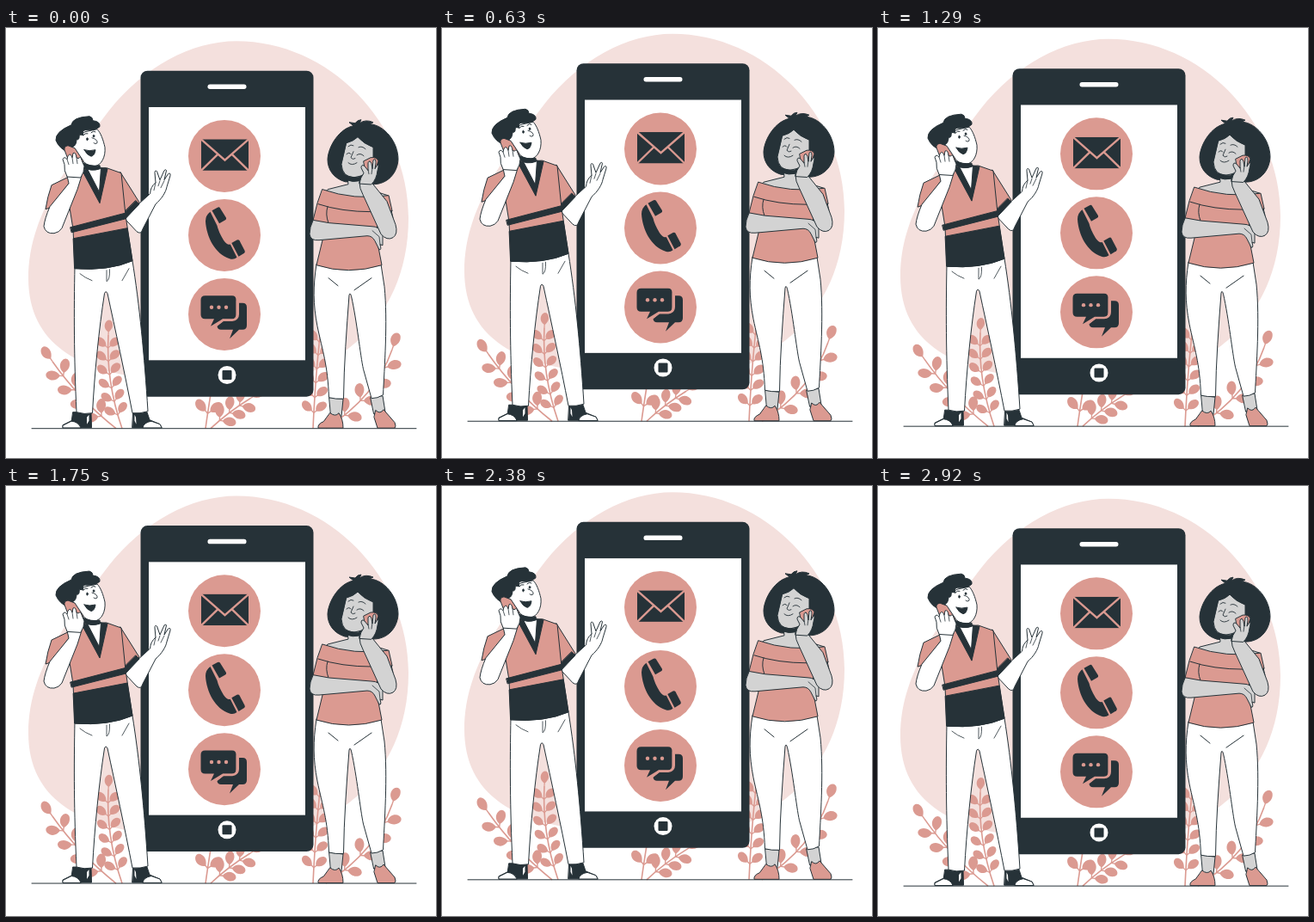
These frames come from a looping animation (500 px wide and 500 px high, 2.96 s). An HTML page:

```html
<!DOCTYPE html>
<html lang="en">
<head>
<meta charset="utf-8">
<title>Phone contact</title>
<style>
html, body { margin: 0; height: 100%; overflow: hidden; background: #fff; }
svg { display: block; width: 100vw; height: 100vh; }
.d { fill: #263238; }
.p { fill: #db9a91; }
.w { fill: #fff; }
.g { fill: #d3d3d3; }
.n { fill: none; }
.o { stroke: #263238; stroke-width: 1; stroke-linejoin: round; stroke-linecap: round; }
.cut { fill: none; stroke: #db9a91; stroke-width: 2.4; }
</style>
</head>
<body>
<svg viewBox="0 0 500 500">
<g id="scene">
  <path fill="#f4e0dd" d="M268 14.500C375 14.500 468 108 468 220C468 285 443 330 410 362C375 392 330 425 230 420C200 420 175 412 150 405C90 395 26 370 26 290C26 250 40 215 60 180C75 155 95 128 120 95C160 45 215 14.500 268 14.500Z"/>
  <g id="plants"></g>

  <g id="device">
    <rect class="d" x="156.500" y="49" width="201" height="379" rx="8"/>
    <rect class="w" x="166" y="91.300" width="182" height="294.300"/>
    <rect class="w" x="234.500" y="64.800" width="45" height="5.500" rx="2.700"/>
    <circle class="w" cx="257" cy="402.800" r="10.500"/>
    <rect class="d" x="251.500" y="397.300" width="11" height="11" rx="1"/>
    <g class="p">
      <circle cx="254" cy="148.200" r="42"/>
      <circle cx="254" cy="240.200" r="42"/>
      <circle cx="254" cy="332.200" r="42"/>
    </g>
    <rect class="d" x="227" y="128.800" width="55" height="36.200"/>
    <path class="cut" d="M226 128L254.500 153L283 128M226 166L246.500 146M283 166L262.500 146"/>
    <g class="d">
      <path d="M237.500 213Q232 217 232 224C233 242 243 262 260 267.500Q265 269 268.500 266L260.800 250.800Q257 252 253 246Q247 236 245.500 229Z"/>
      <path d="M239.500 211.500L246 208Q248 207 249 208.800L256 220Q256.500 221.500 255 222.500L248 226.500Z"/>
      <path d="M262.300 249.300L268.500 245.800Q270.500 244.800 271.500 246.500L277.500 258Q278.500 260 277 261L270.500 265Z"/>
      <path d="M271 319H275Q280 319 280 324V345Q280 350 275 350H271L260 360.500L264 350H250Q246 350 245.500 346L254 339H264Q271 339 271 332Z"/>
      <path d="M231.500 310.500H263Q267.500 310.500 267.500 315.500V332.500Q267.500 337.500 263 337.500H252L238 346L242 337.500H231.500Q226.500 337.500 226.500 332.500V315.500Q226.500 310.500 231.500 310.500Z"/>
    </g>
    <path class="cut" d="M239 349L252.500 339H263Q269 338.500 269 332.500V316"/>
    <g class="p">
      <circle cx="239" cy="324" r="2.200"/><circle cx="247.500" cy="324" r="2.200"/><circle cx="256" cy="324" r="2.200"/>
    </g>
  </g>

  <path class="o n" d="M30 465H477"/>

  <g id="man" class="o">
    <path class="d" d="M78 446H99L99.500 464H66V461L76 456Z"/>
    <path class="d" d="M148 446H164L167 455L179 460L181 464H147Z"/>
    <path class="w" d="M66 464V461.500L76 456.500Q84 457 87 464ZM181 464L179 460L169 456.500Q160 458 159 464Z"/>
    <path class="w" stroke="none" d="M94 452l2.500-3v7l-2.500 4ZM151 452l-1.500-3v7l2 4Z"/>
    <path class="w" d="M80 276C79 330 79 380 82 446Q91 449 100.500 447C103 400 108 350 114.500 308Q116 304 118 308C127 350 138 400 147 447Q156 448 165 445C161 380 155 320 147 270Z"/>
    <path class="n" stroke-width=".8" d="M86 285Q92 290 100 293M143 279L135 293M117 281V294Q121 292 120.500 280"/>
    <path class="w" d="M138 221L152 236Q157 240 159 233L174 204C181 198 186 190 187 184L191 171Q191.500 167 188.500 169L184 176L186.500 165Q186 163 184 165L179 176L175.500 166Q173 164 173 168L174 179Q168 184 167.500 192L151 207Z"/>
    <path class="n" stroke-width=".8" d="M174 179L172 188M179 177L177 183M184 177L180 185"/>
    <path class="p" d="M133 167L155 202L138 221Z"/>
    <path class="d" d="M151 200L155 204L139 221L137 214Z"/>
    <path class="p" d="M90 163L80 169L72 196L78 233L80 279Q119 282 147 270L139 217L134 168L117 162Z"/>
    <path class="d" d="M75 231L138.500 214.500L139.500 221L76.500 237ZM78.500 244L141 232L147 270Q119 282 80 279Z"/>
    <path class="d" d="M88 164L109 203L118 163L110.500 162L108.500 190L95 163Z"/>
    <path class="w" d="M94 162L108.500 190L110.500 162Z"/>
    <path class="w" d="M84 125L92 120L106 117C110 121 113 129 115 138C116 149 111 159 103 160Q93 160 87 151L77 139Z"/>
    <path class="d" d="M89 156Q99 161 109 159L109.500 163Q98 167 90 161Z"/>
    <path class="d" d="M73 144Q62 140 58 130Q57 120 76 112Q77 103 97 102Q101 103 101 107Q110 108 109 114Q104 119 92 118Q88 119 90 124L85 123Q86 130 82 129Q82 136 77 138Z"/>
    <path class="d" d="M91 141Q97 143 104 141Q103 148 99 148.500Q94 147 91 141Z"/>
    <path class="n" d="M100 127Q107 129 106 133Q104 135 102 133" stroke-width=".9"/>
    <ellipse class="d" cx="94.500" cy="128.500" rx=".8" ry="1.500"/><ellipse class="d" cx="102" cy="125" rx=".8" ry="1.400"/>
    <path class="n" d="M90 124Q92 121 95 122M99 121Q102 118 104 120"/>
    <path class="p" d="M80 169L53 182Q48 196 46 210L52 208L73 180Z"/>
    <path class="w" d="M71 171L73 180L51 207Q45 221 44 230Q46 239 56 238Q62 237 65 232L83 187L88 171Z"/>
    <path class="p" d="M68 141Q67 137 72 136L80 139L90 154L86 162L72 151Z"/>
    <path class="w" d="M71 172Q67 165 68 158L66 152Q68 148 71 152L72 148Q75 144 77 150L78 145Q81 143 82 150L84 151Q87 148 88 153L91 160Q91 167 87 173Z"/>
    <path class="n" stroke-width=".8" d="M71 152L73 158M77 150L78 157M82 150L83 157"/>
  </g>

  <g id="woman" class="o">
    <path class="d" d="M404 113L399 109L406 110Q409 106 413 106L411 110Q418 105 427 109L423 111C440 112 456 132 456 152C455 169 443 181 427 181L394 178C381 174 374 164 374 152C375 136 388 116 404 113Z"/>
    <path class="g" d="M376 429L392 431L390 451H378ZM424 429L438 427L441 446L428 448Z"/>
    <path class="p" d="M377 447Q383 452 387 447Q392 454 392 464.500H363Q362 460 369 457ZM430 444Q435 449 439 443L452 458Q454 463 452 464.500H432L428 452Z"/>
    <path class="w" d="M361 274C357 300 357 320 362 346C368 375 374 390 375.500 429Q383 431 392.500 430.500C393 390 396 350 399 310Q400 306 401.500 311C408 340 412 380 415.500 396L425 430Q432 430 438.500 426C440 395 444 340 440 300L436 274Z"/>
    <path class="n" d="M375 290L386 299M425 290L405 304"/>
    <path class="g" d="M397 171L398 181L374 187L366 195L363 220H450L444 194L425 188L411 180V170Z"/>
    <path class="p" d="M368 187Q405 200 445 194L449 212L432 217L431 244L437 275Q398 287 361 275L369 242L357 223L362 203Z"/>
    <path class="n" d="M363 204Q390 213 425 213M374 207Q371 216 375 226M430 214L449 212"/>
    <path class="g" d="M357 223Q353 231 353 239Q354 247 364 246L420 241Q426 241 429 247L434 257Q437 258 435 251L438 252V238Q434 230 425 230L376 226Z"/>
    <path class="n" stroke-width=".8" d="M426 235L434 242L435 251"/>
    <path class="g" d="M396 133Q404 131 409 126Q416 134 427 138V160Q420 171 405 173Q391 173 390 158Z"/>
    <path class="d" d="M396 171Q403 174 411 173V177Q403 179 396 176Z"/>
    <path class="n" stroke-width=".9" d="M396 146Q399 143 401 146M408 147Q412 144 416 148M398 137Q401 134 404 136M410 138Q414 136 418 140M404 143L401 150Q403 153 406 151M398 156Q402 160 408 156"/>
    <path class="g" d="M411 179Q411 186 415 193L436 239Q443 247 450 243Q456 239 453 228L443 201L426 180Z"/>
    <path class="p" d="M416 154L424 150Q431 149 433 154L427 171L418 166Z"/>
    <path class="g" d="M411 180Q412 173 416 168L413 162Q413 157 417 160L421 165L421 156Q423 152 425 157L426 163L427 153Q430 150 430 156L429 163L432 158Q434 158 432 165Q431 175 425 181Z"/>
    <path class="n" stroke-width=".8" d="M421 164L422 169M426 162L425 169"/>
  </g>
</g>
</svg>
<script>
const scene = document.getElementById('scene');
const plants = document.getElementById('plants');
const pink = '#db9a91';

function addPath(d, attrs) {
  const el = document.createElementNS('http://www.w3.org/2000/svg', 'path');
  el.setAttribute('d', d);
  for (const key in attrs) el.setAttribute(key, attrs[key]);
  plants.append(el);
}

function leaf(x, y, angle, size) {
  addPath('M0 -.7L4 -.7C8 -7 15 -7 19 -3Q22 1 18 4C12 7 7 4 4 .7L0 .7Z', {
    fill: pink,
    transform: `translate(${x} ${y}) rotate(${angle}) scale(${size})`
  });
}

// A curved stem with paired leaves and one at its tip.
function branch(x0, y0, cx, cy, x1, y1, pairs, size) {
  addPath(`M${x0} ${y0}Q${cx} ${cy} ${x1} ${y1}`, { fill: 'none', stroke: pink, 'stroke-width': 1.6 });
  for (let i = 1; i <= pairs + 1; i++) {
    const u = i / (pairs + 1), v = 1 - u;
    const x = v * v * x0 + 2 * u * v * cx + u * u * x1;
    const y = v * v * y0 + 2 * u * v * cy + u * u * y1;
    const angle = Math.atan2(v * (cy - y0) + u * (y1 - cy), v * (cx - x0) + u * (x1 - cx)) * 180 / Math.PI;
    if (i > pairs) leaf(x, y, angle, size);
    else for (const side of [-48, 48]) leaf(x, y, angle + side, size);
  }
}

branch(128, 465, 84, 430, 54, 387, 4, 1);
branch(135, 465, 116, 410, 119, 356, 6, 0.85);
branch(232, 465, 234, 450, 238, 425, 1, 1);
branch(238, 465, 258, 446, 284, 430, 3, 0.95);
branch(357, 465, 360, 400, 366, 350, 6, 0.9);
branch(372, 465, 430, 428, 449, 373, 4, 1);

const loop = 2960, frames = 71, step = loop / frames;
const base = 0.7;

function draw(now) {
  const frame = Math.floor((now % loop + 4) / step) % frames;
  const phase = frame / frames * 2 % 1;
  const lift = 10 * (1 - Math.abs(1 - 2 * phase));
  scene.setAttribute('transform', `translate(0 ${base - lift})`);
  requestAnimationFrame(draw);
}
draw(0);
</script>
</body>
</html>
```
